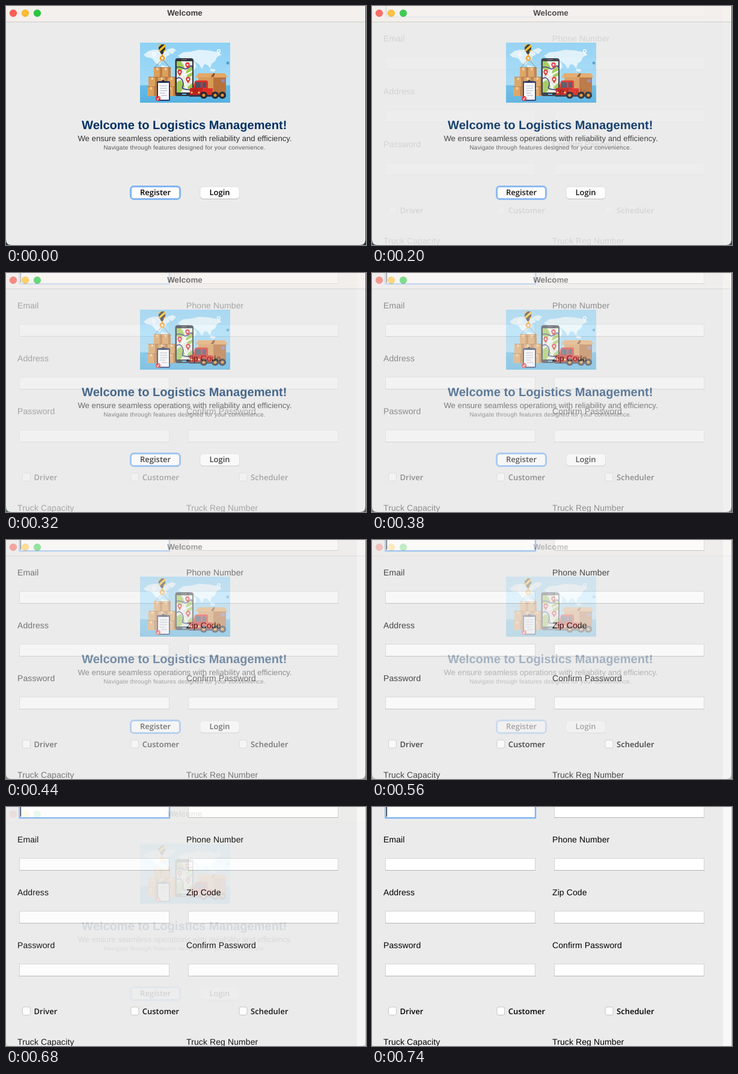
Write an HTML page that moves like this. It is 599 px wide and 398 px high and loops after 0.94 s.

```html
<!DOCTYPE html>
<html lang="en">
<head>
<meta charset="utf-8">
<title>Welcome</title>
<style>
  html, body { margin: 0; width: 100%; height: 100%; overflow: hidden; background: #ebebeb; }
  svg { display: block; }
  text { font-family: "Liberation Sans", Arial, sans-serif; text-rendering: geometricPrecision; }
  .ui { font: 600 13px "Open Sans", "Noto Sans", sans-serif; }
  .mid { text-anchor: middle; }
  .label { font-size: 14px; letter-spacing: .1px; }
  #form { opacity: 0; }
</style>
</head>
<body>
<svg width="599" height="398" viewBox="0 0 599 398">
  <defs>
    <linearGradient id="sky" x2="0" y2="1">
      <stop offset="0" stop-color="#8ed1f5"/>
      <stop offset=".7" stop-color="#a3daf7"/>
      <stop offset=".72" stop-color="#63bae6"/>
      <stop offset="1" stop-color="#55b1e0"/>
    </linearGradient>
    <clipPath id="art"><rect width="150" height="100"/></clipPath>
    <clipPath id="screen"><rect x="61" y="31" width="26" height="52"/></clipPath>
  </defs>

  <g id="welcome">
    <rect width="599" height="398" fill="#26383a"/>
    <path d="M0 0H598V389Q598 398 589 398H9Q0 398 0 389Z" fill="#ebebeb"/>
    <rect width="598" height="26" fill="#f4f0ed"/>
    <rect y="26" width="598" height="1" fill="#cbc9c8"/>
    <g stroke-width=".6">
      <circle cx="12" cy="12" r="5.800" fill="#fe5f57" stroke="#e0443e"/>
      <circle cx="32" cy="12" r="5.800" fill="#febc2e" stroke="#dea123"/>
      <circle cx="52" cy="12" r="5.800" fill="#28c840" stroke="#1aab29"/>
    </g>
    <text class="mid" x="297.5" y="16" font-size="13.4" font-weight="700" fill="#3d3b3a">Welcome</text>

    <g transform="translate(223 61)" clip-path="url(#art)">
      <rect width="150" height="100" fill="url(#sky)"/>
      <g fill="#e0f2fb">
        <path d="M6 20L14 14L22 12L34 12L46 14L50 20L44 23L42 29L36 31L33 37L26 34L20 26L10 24Z"/>
        <path d="M44 12L54 9L60 12L54 19L50 18Z"/>
        <path d="M35 37L46 40L52 46L47 53L44 62L39 56L35 46Z"/>
        <path d="M63 22L72 16L84 15L98 12L114 13L130 16L136 20L128 24L125 31L119 35L117 43L112 37L107 36L103 44L98 36L91 31L84 26L70 27Z"/>
        <path d="M66 31L80 29L92 33L94 40L88 48L83 58L78 48L67 41Z"/>
        <path d="M118 43L126 45L123 49L116 47Z"/>
      </g>
      <g fill="none" stroke="#fff" stroke-width="1.4">
        <path d="M131 17V20M23 22V25"/>
        <circle cx="131" cy="14" r="2.400"/>
        <circle cx="23" cy="19" r="2.400"/>
      </g>
      <circle cx="146" cy="34" r="2.400" fill="#4a9cc8"/>

      <rect x="31" y="3" width="11" height="12" rx="1" fill="#fbb91c"/>
      <path d="M31 8L36 3H41L31 12ZM33 15L42 7V11L38 15Z" fill="#292b33"/>
      <path d="M33 15H40L38 19H35Z" fill="#34363f"/>
      <path d="M37 28L24 42M38 28L50 42" stroke="#8b6b40" stroke-width=".8"/>
      <circle cx="37" cy="26" r="3.200" fill="none" stroke="#f49a20" stroke-width="2.400"/>
      <path d="M37 19V23" stroke="#f49a20" stroke-width="2.400"/>
      <g id="boxes"></g>

      <rect x="58.500" y="26" width="30.500" height="63" rx="4" fill="#30323d"/>
      <rect x="61" y="31" width="26" height="52" fill="#e8eee2"/>
      <g clip-path="url(#screen)" fill="none">
        <path d="M61 31H68L74 41L65 50L61 47ZM76 47L87 38V55L79 59ZM61 66L70 61L76 71L67 83H61ZM79 74L87 67V83H82Z" fill="#9fcb52"/>
        <path d="M60 45L75 54L88 47M71 30L78 43L68 60L83 84" stroke="#fff" stroke-width="2.400"/>
        <path d="M61 41C72 38 73 48 80 42S85 39 88 42M61 60C68 54 74 66 71 73S80 76 88 80" stroke="#3b3d86" stroke-width="1.700"/>
      </g>
      <path d="M70 86H77" stroke="#4fb4e2" stroke-width="2"/>
      <path d="M69 28.500H78" stroke="#777b87"/>
      <g id="pins"></g>

      <path d="M97 57H122V86H97Z" fill="#d99a58"/>
      <path d="M122 57H143V86H122Z" fill="#b8713a"/>
      <path d="M97 57L101 51H139L143 57Z" fill="#89512a"/>
      <path d="M97 51H122L117 58H92ZM125 51H141L146 58H122Z" fill="#e4a766"/>
      <rect x="135" y="61" width="6" height="5" fill="#9489b4"/>
      <path d="M88 76L91 65Q92 63 95 63H110Q113 63 113 66V76H121V89H88Z" fill="#de3027"/>
      <path d="M93 66H101V75H91Z" fill="#4a5368"/>
      <path d="M104 66H110V75H104Z" fill="#4a5368"/>
      <path d="M83 78Q83 75 87 75H104V89H83Z" fill="#c7231f"/>
      <path d="M87 79H97M87 82H97" stroke="#862020"/>
      <circle cx="86" cy="83" r="1.600" fill="#ffd86a"/>
      <circle cx="98" cy="83" r="1.600" fill="#ffd86a"/>
      <path d="M82 87H143V90H82Z" fill="#343846"/>
      <g id="wheels"></g>

      <rect x="28" y="64" width="22" height="33" rx="2" fill="#27396e"/>
      <path d="M30 67H48V95H30Z" fill="#fcfcff"/>
      <path d="M34 67V64H36Q38.500 60 41 64H44V67Z" fill="#202a48"/>
      <path d="M33 72H45M33 76H45M33 80H45M33 84H42M35 88H45" stroke="#a5aac0" stroke-width="1.200"/>
      <circle cx="30" cy="93" r="4" fill="#e3262d"/>
      <path d="M28 93L29.500 95L32 91" fill="none" stroke="#fff" stroke-width="1.100"/>
    </g>

    <text class="mid" x="296.700" y="205" font-size="20.1" font-weight="700" fill="#003063">Welcome to Logistics Management!</text>
    <text class="mid" x="297.500" y="225" font-size="13.17" fill="#333">We ensure seamless operations with reliability and efficiency.</text>
    <text class="mid" x="297" y="239.300" font-size="10" letter-spacing=".23" fill="#5a5a5a">Navigate through features designed for your convenience.</text>

    <rect x="207.500" y="300.500" width="82" height="21" rx="5" fill="#fff" stroke="#82b5f3" stroke-width="3"/>
    <rect x="323" y="301.500" width="65.500" height="20.500" rx="5" fill="#b9b9b9"/>
    <rect x="323" y="301" width="65.500" height="20" rx="5" fill="#fff" stroke="#d6d6d6" stroke-width=".7"/>
    <text class="ui mid" x="248.500" y="315">Register</text>
    <text class="ui mid" x="355.500" y="315">Login</text>
  </g>

  <g id="form">
    <rect width="599" height="398" fill="#ebebeb"/>
    <rect x="584" width="14" height="398" fill="#f8f8f8"/>
    <rect x="598" width="1" height="398" fill="#bcbcbc"/>
  </g>
</svg>
<script>
const NS = "http://www.w3.org/2000/svg";
const form = document.getElementById("form");

function add(parent, tag, attrs, text) {
  const el = document.createElementNS(NS, tag);
  for (const key in attrs) el.setAttribute(key, attrs[key]);
  if (text) el.textContent = text;
  parent.append(el);
}

function box(x, y, w, h) {
  const g = document.getElementById("boxes");
  add(g, "rect", { x, y, width: w, height: h, fill: "#dda05c" });
  add(g, "path", { d: `M${x + w * 0.7} ${y}h${w * 0.3}v${h}h${-w * 0.3}z`, fill: "#bd7d43" });
  add(g, "rect", { x: x + w * 0.3, y, width: 3, height: 5, fill: "#f1cf9c" });
  add(g, "path", { d: `M${x} ${y + 0.4}h${w}`, stroke: "#a3683a", "stroke-width": 0.8 });
}

for (const x of [12, 28, 44]) box(x, 73, 16, 16);
for (const x of [14, 30, 46]) box(x, 57, 16, 16);
for (const x of [23, 37]) box(x, 41, 14, 16);

for (const [x, y] of [[79, 37], [66, 49], [80, 61]]) {
  const g = document.getElementById("pins");
  add(g, "path", { d: `M${x} ${y + 7}L${x - 3.5} ${y + 1}A3.8 3.8 0 1 1 ${x + 3.5} ${y + 1}Z`, fill: "#e22f31" });
  add(g, "circle", { cx: x, cy: y, r: 1.7, fill: "#fff" });
}

for (const x of [106, 125, 137]) {
  const g = document.getElementById("wheels");
  add(g, "circle", { cx: x, cy: 87.5, r: 6, fill: "#272a34" });
  add(g, "circle", { cx: x, cy: 87.5, r: 2.6, fill: "#e59434" });
}

function field(x, y) {
  add(form, "rect", { x: x - 0.5, y: y - 0.5, width: 249, height: 20, fill: "#fff", stroke: "#d4d4d4" });
  add(form, "rect", { x: x - 1, y: y + 19, width: 250, height: 1, fill: "#b4b4b4" });
}

const label = (x, y, text) => add(form, "text", { x, y, class: "label" }, text);

for (let row = 0; row < 4; row++) {
  for (const x of [23, 304]) field(x, 88 * row - 2);
}
add(form, "rect", { x: 22.5, y: -5, width: 249.5, height: 23.2, fill: "#fff", stroke: "#7fb3f3", "stroke-width": 2.4 });
add(form, "rect", { x: 24, y: 0, width: 1, height: 16, fill: "#000" });

[["Email", "Phone Number"], ["Address", "Zip Code"], ["Password", "Confirm Password"]]
  .forEach(([left, right], row) => {
    label(19, 58.5 + 88 * row, left);
    label(300, 58.5 + 88 * row, right);
  });
label(19, 396, "Truck Capacity");
label(300, 396, "Truck Reg Number");

["Driver", "Customer", "Scheduler"].forEach((text, i) => {
  const x = 27 + 180.3 * i;
  add(form, "rect", { x: x + 0.5, y: 333, width: 13, height: 13.5, rx: 3, fill: "#fff", stroke: "#c3c3c3" });
  add(form, "text", { x: x + 19.5, y: 344.5, class: "ui" }, text);
});

// The form fades in over ten equal hard steps, then the loop cuts back.
const LOOP = 940, HOLD = 200, STEP = 60;
const frames = [{ opacity: 0, offset: 0, easing: "step-end" }];
for (let k = 1; k <= 10; k++) {
  frames.push({ opacity: k / 10, offset: (HOLD + STEP * (k - 1)) / LOOP, easing: "step-end" });
}
frames.push({ opacity: 1, offset: 1 });
form.animate(frames, { duration: LOOP, iterations: Infinity });
</script>
</body>
</html>
```
